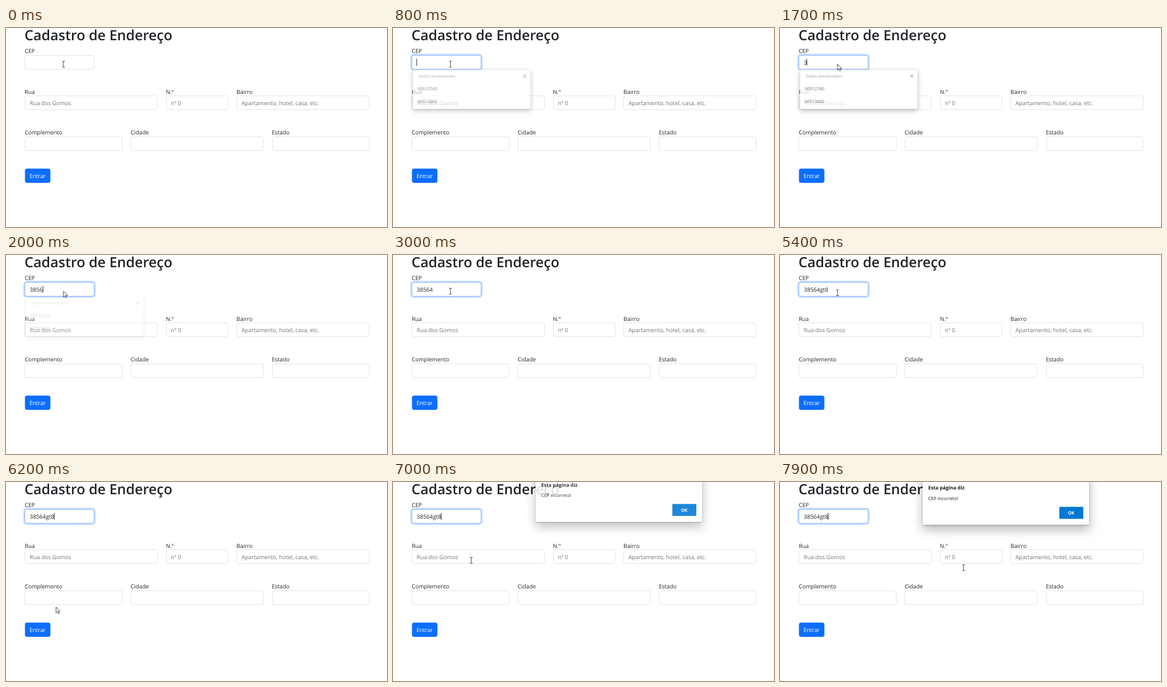
These frames come from a looping animation (716x374 px, 8 s). An HTML page:

```html
<!DOCTYPE html>
<html lang="pt-BR">
<head>
<meta charset="utf-8">
<title>Cadastro de Endereço</title>
<style>
  html, body { margin: 0; width: 100%; height: 100%; overflow: hidden; background: #fff; }
  svg { display: block; width: 716px; height: 374px; }
  text {
    font: 10.6px "Open Sans", "Noto Sans", sans-serif;
    fill: #212529;
    text-rendering: geometricPrecision;
  }
  .title { font-size: 26.4px; font-weight: 600; }
  .field { fill: #fff; stroke: #dfe2e6; }
  .hint { fill: #6c757d; }
  .entrar { font-weight: 500; fill: #fff; }
  #popup rect { fill: #fff; stroke: #d4d4d4; stroke-width: .7; filter: drop-shadow(0 3px 5px rgba(0, 0, 0, .32)); }
  #popup text { font-size: 7.9px; fill: #444; }
  #popup .head { font-size: 7.2px; fill: #888; }
  #dialog .panel { fill: #fff; filter: drop-shadow(0 1px 1px rgba(0, 0, 0, .3)) drop-shadow(0 9px 10px rgba(0, 0, 0, .28)); }
  #dialog text { font-size: 8.6px; fill: #1b1b1b; }
  #dialog .strong { font-size: 9.2px; font-weight: 700; }
  #dialog .ok { font-size: 8.4px; font-weight: 700; fill: #fff; text-anchor: middle; }
</style>
</head>
<body>
<svg viewBox="0 0 716 374">
  <text class="title" x="34.8" y="23">Cadastro de Endereço</text>
  <g id="form"></g>
  <g id="focus">
    <rect x="33.9" y="49.9" width="133.2" height="29.2" rx="5.5" fill="none" stroke="#c2dbfe" stroke-width="2.8"/>
    <rect x="35.5" y="51.5" width="130" height="26" rx="4" fill="#fff" stroke="#86b7fe"/>
  </g>
  <text id="typed" x="44.6" y="68.5"></text>
  <rect id="caret" y="58" width="1" height="13" fill="#212529"/>
  <rect x="35.6" y="264.3" width="47.8" height="26.7" rx="4" fill="#0d6efd"/>
  <text class="entrar" x="44.2" y="282">Entrar</text>
  <g id="popup">
    <rect x="37.5" y="78.3" width="221" height="73.9" rx="2"/>
    <text class="head" x="48" y="93">Dados armazenados</text>
    <path d="M244.6 87.6l6 6m0-6l-6 6" stroke="#555"/>
    <text x="46.8" y="117">00512740</text>
    <text x="46.8" y="141">00513000</text>
  </g>
  <g id="dialog">
    <rect class="panel" x="268" y="-20" width="313" height="100.5" rx="2"/>
    <text class="strong" x="278.6" y="14">Esta página diz</text>
    <text x="278.6" y="33.5">CEP incorreto!</text>
    <rect x="525" y="46.7" width="45" height="22.6" rx="1.2" fill="#0078d4"/>
    <text class="ok" x="547.3" y="61">OK</text>
  </g>
  <g id="pointer">
    <path id="beam" d="M-2.5 -5.5h2l.5 .5l.5 -.5h2M0 -5V5M-2.5 5.5h2l.5 -.5l.5 .5h2" fill="none" stroke="#333"/>
    <path id="arrow" d="M0 0V11l2.6-2.4 1.8 4 1.7-.8-1.7-3.8h3.4Z" fill="#fff" stroke="#222" stroke-width=".9"/>
  </g>
</svg>
<script>
const LOOP = 8000, STEP = 100;
const LEFT = 35.9, TOP = 51.2, ROW = 76.7, GRID = 663, GUTTER = 16.6;
const $ = id => document.getElementById(id);
const crisp = v => Math.floor(v) + .5;
const ramp = (t, from, to) => Math.min(1, Math.max(0, (t - from) / (to - from)));
const between = (t, from, to) => t >= from && t < to;

// Each field: label, share of the row, placeholder.
const rows = [
  [["CEP", .22, ""]],
  [["Rua", .4, "Rua dos Gomos"], ["N.º", .2, "nº 0"], ["Bairro", .4, "Apartamento, hotel, casa, etc."]],
  [["Complemento", .3, ""], ["Cidade", .4, ""], ["Estado", .3, ""]],
];

function fieldMarkup(label, x, y, right, hint) {
  const left = crisp(x), top = crisp(y);
  return `
    <text x="${x - .6}" y="${y - 4.2}">${label}</text>
    <rect class="field" x="${left}" y="${top}" width="${crisp(right) - left}" height="26" rx="4"/>
    <text class="hint" x="${x + 8.7}" y="${y + 17.3}">${hint}</text>`;
}

rows.forEach((row, i) => {
  let x = LEFT;
  for (const [label, share, hint] of row) {
    const next = x + share * GRID;
    $("form").innerHTML += fieldMarkup(label, x, TOP + i * ROW, next - GUTTER, hint);
    x = next;
  }
});

// Times at which keys are pressed: a fast burst, then slower ones.
const typeFrom = (text, start, gap) =>
  [...text].map((char, i) => ({ char, at: Math.floor((start + i * gap) / STEP) * STEP }));
const keys = [...typeFrom("38564", 1700, 100), ...typeFrom("gt8", 3600, 450)];
const FOCUS = 700, SETTLED = 5600;

const glides = [
  { from: 5300, to: 5400, x: 108, y: 71 },
  { from: 5400, to: 5800, x: 62, y: 303 },
  { from: 5800, to: 6200, x: 94, y: 235 },
  { from: 6500, to: 7000, x: 147, y: 147 },
  { from: 7500, to: 7900, x: 345, y: 161 },
];

function pointerAt(t) {
  let x = 108, y = 68;
  for (const glide of glides) {
    const p = ramp(t, glide.from, glide.to);
    x += (glide.x - x) * p;
    y += (glide.y - y) * p;
  }
  return `translate(${x} ${y})`;
}

function draw(now) {
  const t = Math.floor(now % LOOP / STEP) * STEP;

  $("typed").textContent = keys.filter(key => key.at <= t).map(key => key.char).join("");
  const active = [FOCUS, ...keys.map(key => key.at)].some(at => between(t, at, at + 500));
  $("caret").style.opacity = active || t >= SETTLED ? 1 : 0;
  $("caret").setAttribute("x", Math.round(44.3 + $("typed").getComputedTextLength()));

  $("focus").style.opacity = ramp(t, 600, 800);
  $("popup").style.opacity = ramp(t, 600, 900) * (1 - ramp(t, 1600, 2100));

  const away = 1 - ramp(t, 6700, 7100);
  $("dialog").style.opacity = 1 - away ** 1.5;
  $("dialog").setAttribute("transform", `translate(0 ${-22 * away})`);

  $("pointer").setAttribute("transform", pointerAt(t));
  const arrow = between(t, 1700, 2100) || between(t, 5500, 6900);
  $("arrow").style.opacity = arrow ? 1 : 0;
  $("beam").style.opacity = arrow ? 0 : 1;
}

const start = performance.now();
(function frame() {
  draw(performance.now() - start);
  requestAnimationFrame(frame);
})();
</script>
</body>
</html>
```
